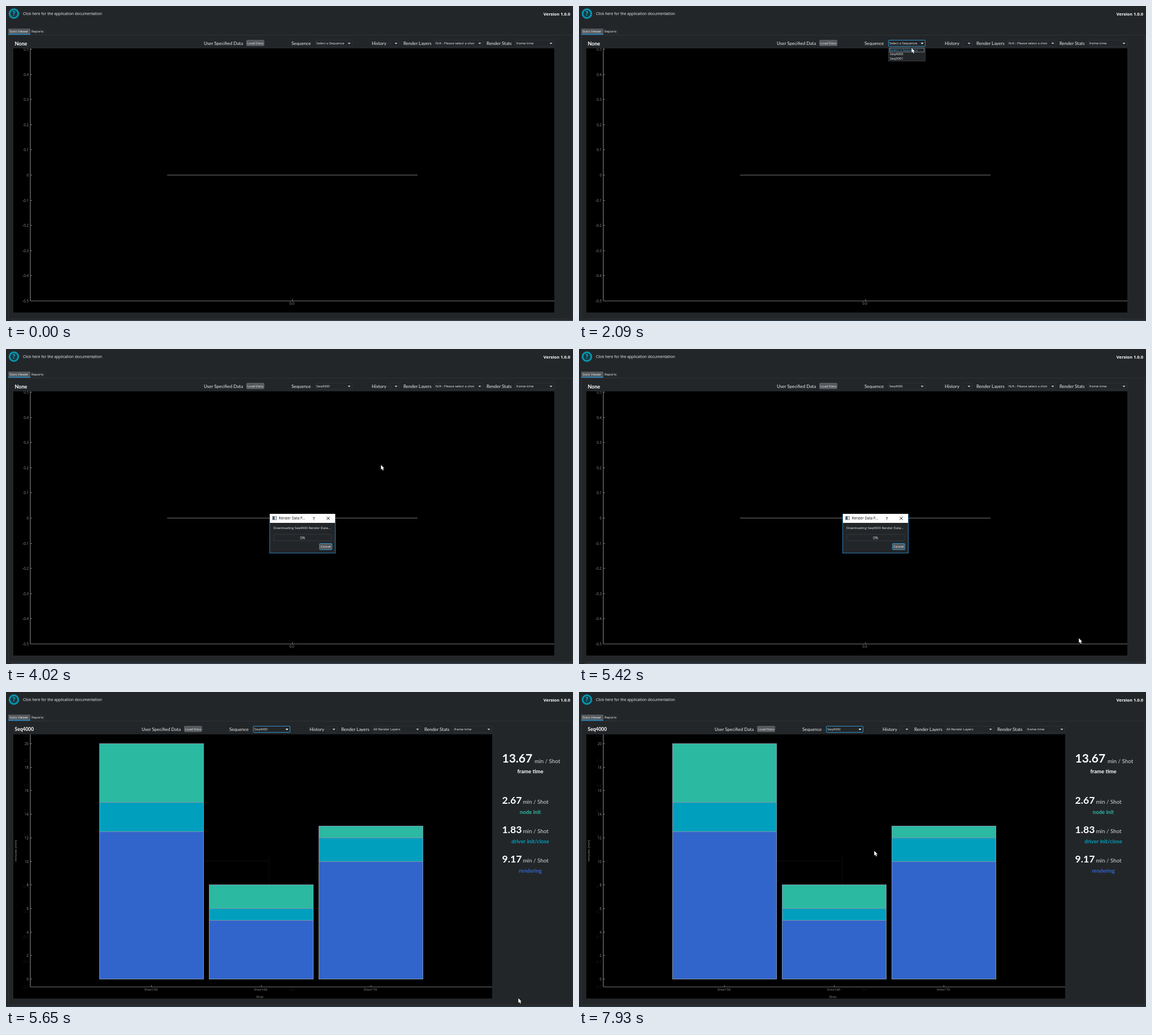
Animation, 1003 px wide and 558 px high, one loop 8 s. Source, as an HTML page with a canvas:

```html
<!DOCTYPE html>
<html lang="en">
<head>
<meta charset="utf-8">
<title>Render stats viewer</title>
<style>
html, body { margin: 0; width: 100%; height: 100%; overflow: hidden; background: #232629; }
canvas { display: block; }
</style>
</head>
<body>
<canvas id="stage" width="1003" height="558"></canvas>
<script>
const ctx = document.getElementById('stage').getContext('2d');
const LOOP = 8000, POPUP = 1450, PICK = 2400, CLOSE = 3010, DIALOG = 3170, LOADED = 5490;
const UI = '"Open Sans", sans-serif', HEAD = 'Lato, sans-serif';
const BG = '#232629', INK = '#eff0f1', AXIS = '#969696', LINE = '#747474', FOCUS = '#2f8fc4', EDGE = '#31363b';
const BLUE = '#3165cc', CYAN = '#009fbe', TEAL = '#2bb9a2';

// Pointer moves: first change, last change, number of steps, end point
const moves = [
  [140, 930, 11, 611, 80], [990, 1160, 3, 594, 68], [2090, 2230, 3, 584, 78],
  [2400, 2400, 1, 580, 81], [2550, 2550, 1, 579, 82], [2860, 2860, 1, 573, 79],
  [3010, 3800, 11, 622, 170], [3880, 4020, 3, 663, 205], [4950, 5650, 10, 906, 542],
  [6200, 6610, 6, 815, 471], [6760, 7550, 11, 640, 404], [7630, 7930, 5, 522, 281]
];

function rect(x, y, w, h, fill, stroke) {
  if (fill) { ctx.fillStyle = fill; ctx.fillRect(x, y, w, h); }
  if (stroke) {
    ctx.strokeStyle = stroke;
    ctx.lineWidth = 1;
    ctx.strokeRect(x + .5, y + .5, w - 1, h - 1);
  }
}

function roundBox(x, y, w, h, fill, stroke) {
  ctx.beginPath();
  ctx.roundRect(x + .5, y + .5, w - 1, h - 1, 1.5);
  ctx.fillStyle = fill;
  ctx.fill();
  ctx.strokeStyle = stroke;
  ctx.lineWidth = 1;
  ctx.stroke();
}

function disc(x, y, r, fill) {
  ctx.beginPath();
  ctx.arc(x, y, r, 0, 7);
  ctx.fillStyle = fill;
  ctx.fill();
}

function shape(points, fill, stroke) {
  ctx.beginPath();
  points.forEach(p => ctx.lineTo(...p));
  ctx.closePath();
  if (stroke) { ctx.strokeStyle = stroke; ctx.lineWidth = 1.2; ctx.stroke(); }
  ctx.fillStyle = fill;
  ctx.fill();
}

// y is the middle of the capital letters
function text(s, x, y, size = 5.9, color = INK, align = 'left', family = UI, weight = 500) {
  ctx.font = `${weight} ${size}px ${family}`;
  ctx.textAlign = align;
  ctx.fillStyle = color;
  ctx.fillText(s, x, y + size * .36);
}

function combo(x, w, label, focused, color = INK) {
  roundBox(x, 60, w, 12, BG, focused ? FOCUS : '#2b2f33');
  text(label, x + 2, 66, 5.9, color);
  const a = x + w - 6;
  shape([[a - 2.5, 65], [a + 2.5, 65], [a, 67.8]], focused ? '#fff' : '#c4c6c8');
}

function button(x, y, w, h, label, border) {
  roundBox(x, y, w, h, '#54585c', border);
  text(label, x + w / 2, y + h / 2, 5.9, INK, 'center');
}

function chrome(busy) {
  rect(0, 0, 1003, 558, BG);
  disc(14, 13.5, 9.2, '#0797b0');
  disc(14, 13.5, 6.3, '#173b46');
  text('?', 14, 13.5, 10, '#14b4cf', 'center', UI, 700);
  text('Click here for the application documentation', 30, 13.8, 6.75);
  text('Version 1.0.0', 998, 13.8, 7.5, '#fff', 'right', UI, 700);

  rect(4, 51, 998, 504, null, '#2e3235');
  rect(4, 40, 39, 10, '#54585c');
  rect(4, 49, 39, 2, '#2d7fae');
  rect(43, 40, 27, 11, '#26292c');
  text('Stats Viewer', 6, 45.3);
  text('Reports', 45, 45.3);
  rect(busy ? 0 : 10, 557, 1003, 1, busy ? '#2f4459' : '#465566');
}

function toolbar(t, loaded) {
  const dx = loaded ? -110 : 0;
  const label = (s, x) => text(s, x + dx, 65.8, 8, INK, 'left', HEAD, 400);
  const sequence = t < CLOSE ? 'Select a Sequence' : 'Seq4000';
  text(loaded ? 'Seq4000' : 'None', 15.5, 66.3, loaded ? 8.5 : 9, '#fff', 'left', HEAD, 700);
  label('User Specified Data', 350);
  button(425 + dx, 60, 32, 11, 'Load Data', '#5c6064');
  label('Sequence', 505);
  combo(547 + dx, 66, sequence, loaded || (t >= 1060 && t < CLOSE));
  label('History', 647);
  combo(677 + dx, 19, ' :', false, '#777b7e');
  label('Render Layers', 703);
  combo(758 + dx, 86, loaded ? 'All Render Layers' : 'N/A : Please select a shot');
  label('Render Stats', 850);
  combo(901 + dx, 69, 'frame time');
}

function axes(right) {
  rect(42.5, 75, 1, 447, AXIS);
  rect(43, 522, right - 43, 1, LINE);
}

function yTick(value, y) {
  rect(43, Math.floor(y), 3, 1, LINE);
  text(value, 40, y + .3, 6.2, AXIS, 'right');
}

function plotFrame(width) {
  ctx.save();
  ctx.beginPath();
  ctx.rect(13, 75, width, 468);
  ctx.clip();
  rect(13, 75, width, 468, '#000');
}

function emptyPlot() {
  plotFrame(957);
  axes(970);
  for (let i = 5; i >= -5; i--) yTick(i ? (i / 10).toFixed(1) : '0', 299.5 - i * 44.6);
  rect(506, 519, 1, 3, LINE);
  text('0.0', 505.5, 526.8, 6.2, AXIS, 'center');
  rect(285, 299, 443, 1, LINE);
  ctx.restore();
}

function barPlot() {
  plotFrame(847);
  // Faint remains of the previous view
  for (let i = 5; i >= -5; i--) {
    if (i) text((i / 10).toFixed(1), 40, 299.8 - i * 44.6, 6.2, '#1d1d1d', 'right');
  }
  text('0.0', 505.5, 526.8, 6.2, '#222', 'center');
  rect(349, 299, 117, 1, '#0e0e0e');
  rect(465, 291, 1, 70, '#0c0c0c');

  axes(860);
  const unit = 20.85, zero = 508;
  for (let v = 0; v <= 20; v += 2) yTick(v, zero + .5 - v * unit);
  [[12.5, 2.5, 5], [5, 1, 2], [10, 2, 1]].forEach((parts, i) => {
    const x = 164.5 + i * 194;
    let sum = 0;
    parts.forEach((v, k) => {
      const top = Math.round(zero - (sum + v) * unit), bottom = Math.round(zero - sum * unit);
      rect(Math.round(x), top, 185, bottom - top + 1, [BLUE, CYAN, TEAL][k], '#7f93a6');
      sum += v;
    });
    rect(257 + i * 194, 519, 1, 3, LINE);
    text(`Shot${150 + i * 10}`, 256.5 + i * 194, 526.8, 6.1, AXIS, 'center');
  });
  text('Shot', 449, 539.5, 6.1, AXIS, 'center');
  ctx.translate(17, 281.5);
  ctx.rotate(-Math.PI / 2);
  text('minutes (min)', 0, 0, 5.9, AXIS, 'center');
  ctx.restore();
}

function summary() {
  const stat = (value, size, unitX, y, name, nameY, color) => {
    text(value, 877.5, y, size, '#fff', 'left', HEAD, 700);
    text('min / Shot', unitX, y + (size > 20 ? 4.5 : 3), 9.9, '#d5d7d8', 'left', HEAD, 400);
    text(name, 927.5, nameY, 9.5, color, 'center', HEAD, 700);
  };
  stat('13.67', 21, 935, 117.5, 'frame time', 141, '#fff');
  stat('2.67', 17.7, 914.5, 191.5, 'node init', 212.5, TEAL);
  stat('1.83', 17.7, 914.5, 243.5, 'driver init/close', 264.5, CYAN);
  stat('9.17', 17.7, 914.5, 295.5, 'rendering', 316.5, BLUE);
}

function popup(selected) {
  rect(547, 73, 66, 25, BG, '#34393d');
  ['Select a Sequence', 'Seq4000', 'Seq5001'].forEach((s, i) => {
    const y = 77.6 + i * 7.4;
    if (i === selected) rect(549, Math.round(y - 4), 62, 8, BG, '#76797c');
    text(s, 550, y, 5.9, i === selected ? '#3498d0' : INK);
  });
}

function dialog(x, w, title, message, percent, alpha = 1) {
  const right = x + w, done = percent === 100;
  ctx.save();
  ctx.globalAlpha = alpha;
  rect(x, 292, w, 70, BG, done ? '#2a4a66' : '#2b7cb3');
  rect(x + 1, 292, w - 2, 16, '#fff');
  rect(x + 5, 296, 8, 7, '#d4d8dc', '#8d949a');
  rect(x + 6, 297, 3, 5, '#46586a');
  text(title, x + 16.5, 300.2, 6.3, '#111', 'left', UI, done ? 600 : 400);
  if (!done) {
    text('?', x + 78.5, 300, 7.5, '#111', 'center', UI, 600);
    ctx.beginPath();
    for (const s of [-1, 1]) {
      ctx.moveTo(right - 13 - 2.7, 300 - 2.7 * s);
      ctx.lineTo(right - 13 + 2.7, 300 + 2.7 * s);
    }
    ctx.strokeStyle = '#111';
    ctx.lineWidth = .9;
    ctx.stroke();
  }
  text(message, x + 7, 316.5, 5.85);
  roundBox(x + 7, 328, w - 14, 12, done ? '#2b78a8' : BG, EDGE);
  text(percent + '%', x + w / 2, 334.3, 6.2, INK, 'center');
  button(right - 29, 344, 23, 12, 'Cancel', FOCUS);
  ctx.restore();
}

function pointerAt(t) {
  let x = 1016, y = 646;
  for (const [start, end, steps, toX, toY] of moves) {
    if (t < start) break;
    const gap = steps > 1 ? (end - start) / (steps - 1) : 1;
    const k = Math.min(steps, Math.floor((t - start) / gap + .04) + 1) / steps;
    const ease = 1 - (1 - k) ** 2;
    x += (toX - x) * ease;
    y += (toY - y) * ease;
    if (k < 1) break;
  }
  return [x, y];
}

function pointer(t) {
  ctx.save();
  ctx.translate(...pointerAt(t).map(Math.round));
  ctx.lineJoin = 'round';
  shape([[.3, .3], [.3, 8.8], [2.2, 7], [3.6, 10.2], [5, 9.6], [3.6, 6.5], [6.2, 6.4]], '#fff', '#000');
  ctx.restore();
}

function draw(t) {
  const loaded = t >= LOADED, open = t >= POPUP && t < CLOSE;
  chrome(loaded || open);
  toolbar(t, loaded);
  if (loaded) {
    barPlot();
    summary();
    if (t < 5650) {
      dialog(467, 110, 'Render Data ...', 'Processing Seq4000 Render Data...', 100, t < 5572 ? .6 : .15);
    }
  } else {
    emptyPlot();
    if (open) popup(t < PICK ? 0 : 1);
    if (t >= DIALOG) dialog(466, 117, 'Render Data P...', 'Downloading Seq4000 Render Data...', 0);
  }
  pointer(t);
}

function tick() {
  draw(performance.now() % LOOP);
  requestAnimationFrame(tick);
}
tick();
</script>
</body>
</html>
```
